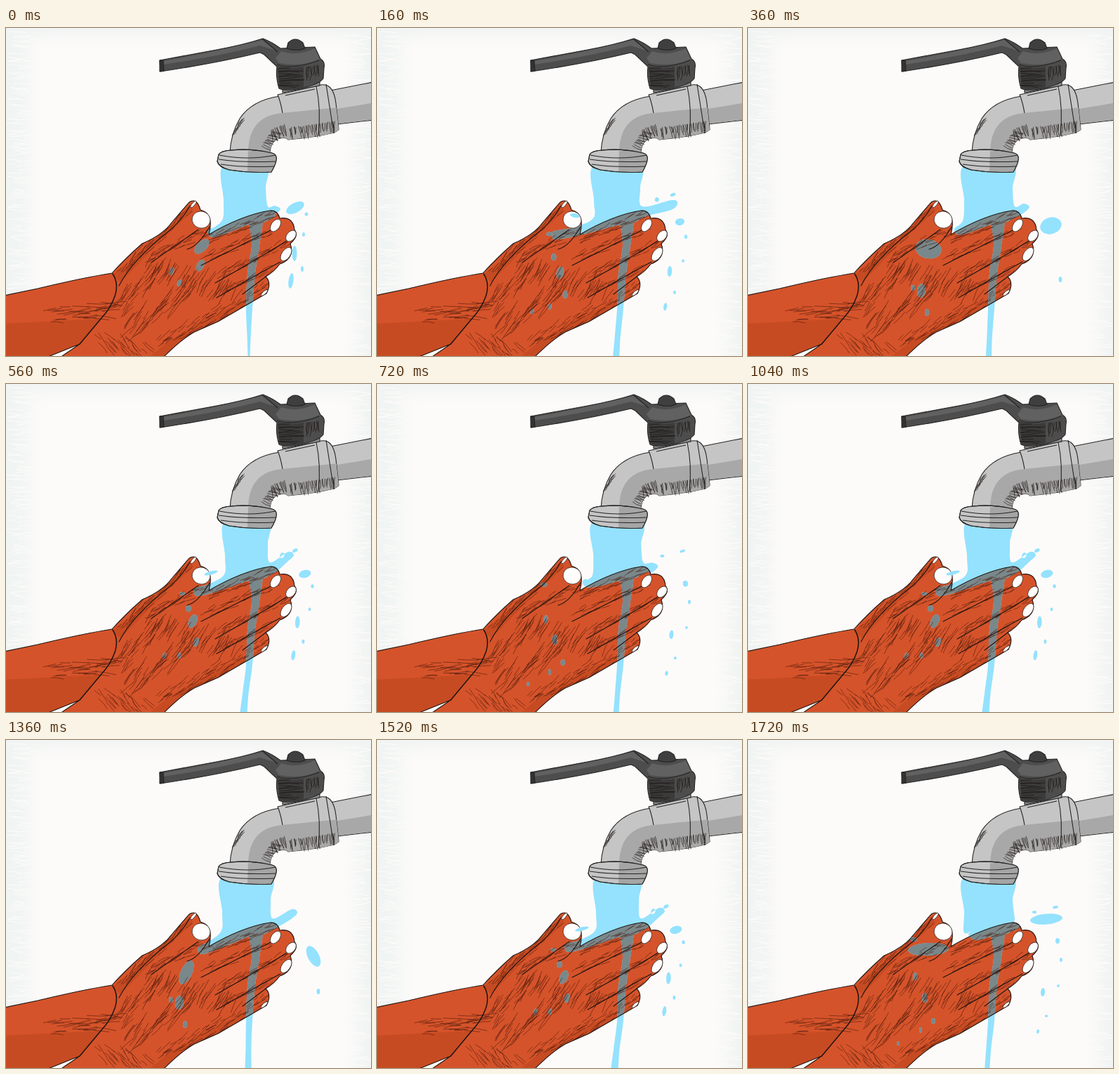
Animation, 520 px wide and 467 px high, one loop 1.76 s. Source, as an HTML page:

```html
<!DOCTYPE html>
<html lang="en">
<head>
<meta charset="utf-8">
<title>Hand washing</title>
<style>
html, body { margin: 0; width: 100%; height: 100%; overflow: hidden; background: #f2f5f3; }
svg { display: block; width: 100vw; height: 100vh; }
.ln { fill: none; stroke: #1d1512; stroke-linecap: round; stroke-linejoin: round; }
</style>
</head>
<body>
<svg viewBox="0 0 520 467">
  <defs>
    <path id="hand" d="M-3 381L45 371Q112 355 151 349Q171 327 194 307Q224 294 236 277L261 248Q272 241 277 259Q297 264 289 294Q337 266 376 260Q387 259 390 271Q409 268 411 287Q418 296 405 307Q412 328 390 336Q382 347 370 354Q379 363 371 378Q328 403 302 418L268 433Q249 444 224 469H77L105 450L55 470H-3Z"/>
    <clipPath id="skin"><use href="#hand"/></clipPath>
    <path id="spout" d="M390 97Q350 103 333 129Q320 151 319 178H376Q377 153 402 157Z"/>
    <path id="collar" d="M387 95L445 82Q466 75 470 107L474 144Q473 152 402 159Q398 157 397 151Q395 114 387 95Z"/>
    <path id="rim" d="M303 180Q306 175 320 174Q349 171 379 178Q392 181 378 205Q348 207 318 202Q303 198 301 190Z"/>
    <clipPath id="metal"><use href="#spout"/><use href="#collar"/><use href="#rim"/></clipPath>
    <filter id="soft"><feGaussianBlur stdDeviation="11"/></filter>
  </defs>

  <rect width="520" height="467" fill="#f0f4f2"/>
  <rect x="34" y="12" width="464" height="480" fill="#fdfbfa" filter="url(#soft)"/>
  <path id="paper" fill="none" stroke="#fdfcfb"/>

  <use href="#hand" fill="#d5532a"/>
  <g clip-path="url(#skin)" fill="#bf461e" opacity=".6">
    <path d="M-3 421L135 414L104 450L55 470H-3Z"/>
    <path d="M151 352L215 300L262 252L267 260L226 297L163 362Z"/>
    <path d="M204 469Q250 425 374 374L250 470Z"/>
  </g>

  <path id="water" fill="#94e2fe"/>
  <path id="wet" fill="#79888b" clip-path="url(#skin)"/>

  <g class="ln">
    <path id="wrinkles" clip-path="url(#skin)" stroke="#47180b" stroke-width=".75" opacity=".75"/>
    <use href="#hand" stroke-width="1.1"/>
    <path stroke-width="1.5" d="M152 350Q161 364 155 382Q149 399 136 413L105 450"/>
    <path stroke-width="1.1" d="M262 253Q251 274 231 290Q180 330 161 367M290 283Q274 311 258 315M274 287Q262 295 207 334M377 288Q353 300 278 338M400 303Q377 318 298 363M391 333Q372 343 300 384M370 354L337 379"/>
  </g>
  <path id="nails" fill="#fffefd" stroke="#32231d" stroke-width=".8"/>
  <path id="over" fill="#94e2fe"/>

  <g stroke="#252525" stroke-width="1.1" stroke-linejoin="round" fill="#c5c5c5">
    <path d="M462 89L523 77V131L472 137Z"/>
    <path fill="#a8a8a8" stroke="none" d="M466 116L520 107V131L473 136Z"/>
    <use href="#spout"/><use href="#collar"/>
    <path clip-path="url(#metal)" fill="#a8a8a8" stroke="none" d="M345 178Q345 125 394 121L474 113V150L402 162L376 181Z"/>
    <use href="#rim"/>
    <path clip-path="url(#metal)" fill="#a5a5a5" stroke="none" d="M345 175H390V205H344Z"/>
    <g fill="none">
      <use href="#rim"/>
      <path d="M304 181Q345 189 384 181M303 187Q336 192 384 190M306 194Q337 199 382 197M442 83Q449 115 445 153M456 80L467 150M398 96L440 87"/>
    </g>
    <path fill="#8e8e8e" d="M394 88V92L447 82V77Z"/>
    <path fill="#4d4d4d" d="M219 46L300 31Q338 24 366 15Q379 20 391 29L440 27L448 44Q455 48 453 57L452 72Q446 80 424 85Q398 91 389 86Q384 70 386 55L368 38L362 35Q300 50 220 62Z"/>
    <g stroke="none" fill="#616161">
      <path d="M392 33Q414 41 440 29L447 44Q423 56 389 50L384 43Z"/>
      <path d="M224 47Q304 33 365 17L384 32L362 25Q300 41 224 52Z"/>
      <path fill="#3b3b3b" d="M387 54Q405 59 424 55V84Q400 90 390 85Z"/>
    </g>
    <path fill="#3f3f3f" d="M402 21Q412 11 423 21L426 29Q414 34 400 29Z"/>
    <path fill="#333" d="M219 46H224L225 61L219 62Z"/>
    <path fill="none" d="M386 52Q410 60 446 46M366 16L387 34"/>
  </g>
  <path id="ribs" class="ln" stroke-width=".8" opacity=".85"/>
</svg>
<script>
const put = (id, d) => document.getElementById(id).setAttribute('d', d);
let seed = 7;
const rnd = () => (seed = (seed * 16807) % 2147483647) / 2147483647;
const near = s => (rnd() - .5) * 2 * s;
const mix = (a, b, k) => a + (b - a) * k;
const blend = (a, b, k) => a.map((v, i) => mix(v, b[i], k));

// Strokes scattered along a segment, leaning at an angle in degrees
const hatch = (gap, spread) => ([x1, y1, x2, y2, len, deg]) => {
  const n = Math.ceil(Math.hypot(x2 - x1, y2 - y1) / gap);
  let d = '';
  for (let i = 0; i < n; i++) {
    const k = (i + .5) / n, l = len * (.5 + rnd() * .8), a = (deg + near(12)) * Math.PI / 180;
    const dx = Math.cos(a) * l, dy = Math.sin(a) * l;
    d += `M${mix(x1, x2, k) + near(spread)} ${mix(y1, y2, k) + near(spread)}q${dx / 2 + near(2)} ${dy / 2 + near(2)} ${dx} ${dy}`;
  }
  return d;
};

const fingers = [
  [160, 350, 255, 262, 13, -48], [195, 330, 282, 292, 13, -28],
  [285, 304, 378, 267, 14, -24], [280, 330, 375, 290, 13, -26],
  [300, 356, 396, 308, 13, -32], [300, 380, 370, 346, 12, -32],
  [318, 401, 370, 366, 11, -36]
];
const palm = [
  [205, 350, 315, 385, 22, -60], [155, 405, 215, 350, 19, -55],
  [165, 440, 258, 380, 23, -48], [215, 450, 310, 408, 17, -36],
  [62, 408, 140, 401, 24, -2], [130, 440, 195, 455, 18, 48]
];
put('wrinkles', fingers.map(hatch(2.9, 5)).join('') + palm.map(hatch(2.3, 11)).join(''));
put('ribs', [
  [364, 168, 380, 147, 14, 18], [376, 146, 398, 137, 15, 72],
  [402, 143, 470, 133, 15, 85], [322, 155, 336, 132, 8, -58],
  [388, 58, 389, 84, 30, -3], [427, 56, 447, 53, 16, 88]
].map(hatch(2.2, 1)).join(''));
put('paper', [8, 488].map(x => hatch(3.5, 9)([x, 5, x, 462, 26, 0])).join(''));

// Ellipse from centre, radii and turn
function drop([x, y, rx, ry, turn = 0]) {
  const a = turn * Math.PI / 180, dx = rx * Math.cos(a), dy = rx * Math.sin(a);
  const arc = `A${rx} ${ry} ${turn} 1 1 `;
  return `M${x - dx} ${y - dy}${arc}${x + dx} ${y + dy}${arc}${x - dx} ${y - dy}Z`;
}
put('nails', [
  [278, 273, 13, 12, 15], [267, 251, 6, 2, -50], [384, 281, 10, 6, -55],
  [406, 296, 9, 6, -50], [399, 322, 11, 6, -55], [368, 377, 6, 2, -42]
].map(drop).join(''));

// Closed smooth curve through points
function smooth(p) {
  const n = p.length, at = i => p[(i + n) % n];
  let d = `M${p[0]}`;
  p.forEach((b, i) => {
    const a = at(i - 1), c = at(i + 1), e = at(i + 2);
    d += `C${[0, 1].map(j => b[j] + (c[j] - a[j]) / 6)} ${[0, 1].map(j => c[j] - (e[j] - b[j]) / 6)} ${c}`;
  });
  return d + 'Z';
}

// Water states: left and right edge, left tip, right tip, foot x and width
const keys = [
  [310, 370, 287, 291, 391, 258, 345, 2],
  [312, 373, 267, 295, 410, 244, 333, 9],
  [309, 375, 249, 294, 428, 250, 336, 8],
  [308, 377, 314, 277, 387, 264, 337, 6],
  [308, 377, 273, 298, 415, 246, 341, 8]
];

function stream([l, r, wx, wy, sx, sy, fx, fw]) {
  const body = [
    [l, 195], [l, 245], [l - 1, 271], [mix(l, wx, .5), mix(272, wy, .5) + 1],
    [wx + 4, wy - 5], [wx, wy], [wx + 7, wy + 7], [mix(wx, 346, .5), mix(wy + 8, 280, .5) + 2],
    [346, 280], [364, 278], [384, 268], [sx - 9, sy + 9], [sx, sy], [sx - 8, sy - 5],
    [r + 3, 254], [r, 228], [r, 195]
  ];
  const run = [
    [347, 270, 18], [350, 310, 11], [344, 350, 11], [342, 400, 9],
    [mix(342, fx, .55), 440, mix(8, fw, .5)], [fx, 478, fw]
  ];
  const right = run.map(([x, y, w]) => [x + w, y]).reverse();
  return smooth(body) + smooth(run.map(([x, y]) => [x, y]).concat(right));
}

// Falling drops: from x y rx ry turn, to x y rx ry turn
const outer = [
  [412, 256, 14, 7, -28, 441, 286, 3, 4, 0], [428, 265, 2.5, 2.5, 0, 446, 313, 2, 3, 0],
  [411, 321, 3.5, 11, 0, 420, 359, 3, 6, 5], [406, 360, 3.5, 11, 8, 413, 415, 2, 3, 8],
  [422, 343, 2, 4, 0, 425, 393, 2, 2, 0], [424, 294, 2, 3, 0, 442, 350, 2, 2, 0]
];
const inner = [
  [279, 311, 7, 13, 45, 252, 367, 4, 7, 0], [277, 338, 5, 9, 30, 264, 400, 3, 4, 0],
  [247, 363, 3, 5, 20, 246, 413, 2, 4, 0], [236, 346, 3, 6, 25, 214, 432, 2, 3, 10]
];
const second = [
  [380, 243, 3, 6, 40, 408, 245, 3, 2, 0], [388, 236, 4, 3, -35, 438, 238, 4, 2, -15],
  [280, 304, 5, 3, -10, 238, 337, 3, 6, 10], [265, 312, 3, 2, 0, 236, 284, 5, 3, 0]
];
const blobs = [[425, 255, 23, 7.5, -5], [257, 298, 29, 9, -3]];
const late = [
  [438, 308, 8, 16, -28], [257, 331, 8, 18, 25], [247, 374, 6, 10, 8],
  [255, 405, 3, 5], [235, 370, 3, 4], [445, 358, 2.5, 4]
];
const splash = { 2: [292, 269, 10, 2.5, -15], 3: [282, 267, 7, 3, 12] };

function spots(pose) {
  if (pose === 8) return late;
  if (pose === 7) return blobs.map((b, i) => blend(b, late[i], .5)).concat(late.slice(2));
  const k = 1 - (1 - pose / 6) ** 1.6;
  const fall = outer.concat(inner, pose > 1 ? second : []);
  const list = fall.map(r => blend(r.slice(0, 5), r.slice(5), k));
  return pose === 6 ? list.concat(blobs) : list;
}

// Key position of each of the nine poses
const order = [0, .5, 1, 2, 2.33, 2.67, 3, 3.5, 4];
let last = -1;
function draw(time) {
  const t = time % 1760;
  // Three drawings per 160 ms, the third held twice as long, plus a last one
  const step = t >= 1720 ? 33 : Math.floor(t / 160) * 3 + Math.min(2, Math.floor(t % 160 / 40));
  if (step === last) return;
  last = step;
  const pose = step % 9, at = order[pose], i = Math.floor(at);
  const d = stream(blend(keys[i], keys[Math.min(i + 1, 4)], at - i)) + spots(pose).map(drop).join('');
  put('water', d);
  put('wet', d);
  put('over', splash[pose] ? drop(splash[pose]) : '');
}

const start = performance.now();
function tick() {
  draw(performance.now() - start);
  requestAnimationFrame(tick);
}
tick();
</script>
</body>
</html>
```
